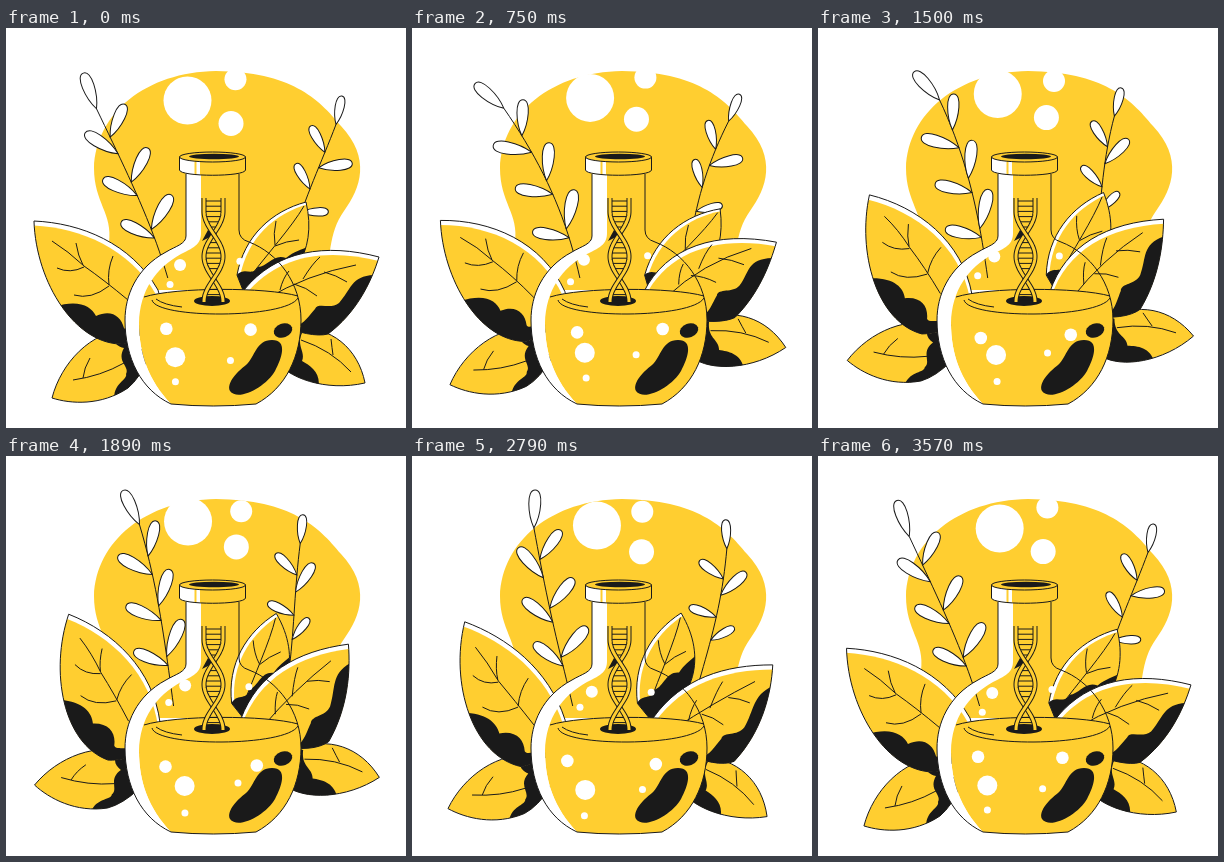
An HTML page with a canvas for the animation above (3600 ms loop, 400 by 400 pixels).

```html
<!DOCTYPE html>
<html>
<head>
<meta charset="utf-8">
<title>Flask and leaves</title>
<style>
html, body { margin: 0; height: 100%; overflow: hidden; background: #fff; }
canvas { display: block; }
</style>
</head>
<body>
<canvas id="stage" width="400" height="400"></canvas>
<script>
const ctx = document.getElementById('stage').getContext('2d');
const YELLOW = '#ffce30', INK = '#1a1a1a', WHITE = '#fff';
const LOOP = 3600, RAD = Math.PI / 180;

let now = 0;
const wave = (peak) => Math.cos((now - peak) / LOOP * 2 * Math.PI);

function fill(path, color) {
  ctx.fillStyle = color;
  ctx.fill(path);
}

function line(path, width = 1, color = INK) {
  ctx.lineWidth = width;
  ctx.strokeStyle = color;
  ctx.stroke(path);
}

function oval(x, y, rx, ry = rx, tilt = 0) {
  const path = new Path2D();
  path.ellipse(x, y, rx, ry, tilt * RAD, 0, 7);
  return path;
}

// Bubbles drift on small circles: x, y, size, orbit, start angle
const backBubbles = [
  [181.5, 69, 24, 3.5, 0], [227.5, 93, 12.5, 3.5, 45], [232.5, 53, 11, 3.5, 120]
];
const glassBubbles = [
  [176.3, 233, 6, 4.5, 30], [163, 251.5, 3.5, 5, -12], [238.3, 231.7, 3.5, 4.7, 70]
];
const liquidBubbles = [
  [160.3, 305.7, 6.3, 5, 180], [174, 329.3, 10, 4.7, 90], [174.3, 355, 3.5, 5, 103],
  [248, 305.3, 6.3, 5, 137], [228, 329.5, 3.5, 4.7, 49]
];

function drawBubbles(list) {
  for (const [x, y, size, orbit, start] of list) {
    const a = start * RAD + now / LOOP * 2 * Math.PI;
    fill(oval(x - orbit * Math.sin(a), y + orbit * Math.cos(a), size), WHITE);
  }
}

// Leaves are drawn in their pose at time 0 and bend around a pivot;
// swing and peak are [at the pivot, added per pixel of distance].
const leaves = {
  back: {
    pivot: [230, 265], swing: [13.7, 0], peak: [560, 0], shine: [3, 2],
    body: 'M300,174 C266,183 238,208 231,247 L240,270 C285,262 312,225 300,174Z',
    dark: 'M228,250 C238,236 245,250 252,239 C262,238 268,225 280,230 C290,222 298,222 308,215 L300,270 L230,280Z',
    veins: 'M298,178 C285,200 262,225 240,254 M270,193 Q267,206 269,217 M293,212 Q280,213 269,218'
  },
  lowLeft: {
    pivot: [130, 310], swing: [-12.5, 0], peak: [30, 0], shine: [0, 0],
    body: 'M46,370 C55,335 85,303 120,302 L142,330 Q134,350 122,360 C95,378 65,376 46,370Z',
    dark: 'M116,298 C103,310 108,318 118,320 C110,334 124,338 120,346 C122,352 105,356 109,374 L160,364 L150,300Z',
    veins: 'M118,335 Q95,348 67,352 M84,330 Q78,340 77,350'
  },
  lowRight: {
    pivot: [272, 298], swing: [17.5, 0], peak: [-500, 0], shine: [0, 0],
    body: 'M359,355 C352,320 325,298 290,300 L268,330 C280,350 320,364 359,355Z',
    dark: 'M280,290 L297,303 C289,318 300,323 296,333 C305,338 316,345 312,362 L262,352Z',
    veins: 'M295,312 Q325,322 345,344 M325,311 Q326,320 327,327'
  },
  left: {
    pivot: [140, 270], swing: [10.8, .011], peak: [1770, 2.9], shine: [-2, 4.5],
    body: 'M28,193 C75,195 125,215 152,262 C160,285 140,308 118,316 C70,318 30,255 28,193Z',
    dark: 'M48,279 C72,271 85,278 90,288 C105,281 115,288 118,300 C122,305 132,292 150,298 L118,334 L52,326Z',
    veins: 'M46,213 Q62,223 78,238 Q98,252 122,272 M70,215 Q72,228 77,237 M51,240 Q64,246 78,239 M107,228 Q101,242 103,257 M68,267 Q85,272 103,258'
  },
  right: {
    pivot: [245, 293], swing: [10.3, 0], peak: [-900, 6.6], shine: [1.5, 4.5],
    body: 'M373,229 C320,215 270,222 238,262 C245,290 300,312 322,306 C350,285 365,255 373,229Z',
    dark: 'M368,247 C345,248 345,262 333,275 C325,282 312,274 309,281 C303,287 295,302 285,296 L320,330 L380,270Z',
    veins: 'M350,237 Q302,246 258,272 M314,229 Q306,236 297,251 M341,254 Q330,247 318,244 M283,243 Q277,250 274,262 M311,268 Q300,259 288,256'
  }
};

function drawLeaf({ pivot: [px, py], swing, peak, shine, body, dark, veins }) {
  const bend = (text) => new Path2D(text.replace(/([\d.]+),([\d.]+)/g, (_, x, y) => {
    const dx = x - px, dy = y - py, d = Math.hypot(dx, dy);
    const top = peak[0] + peak[1] * d;
    const rest = Math.cos(top / LOOP * 2 * Math.PI);
    const a = (swing[0] + swing[1] * d) * (wave(top) - rest) * RAD;
    const c = Math.cos(a), s = Math.sin(a);
    return (px + dx * c - dy * s).toFixed(2) + ',' + (py + dx * s + dy * c).toFixed(2);
  }));
  const shape = bend(body);
  fill(shape, WHITE);
  ctx.save();
  ctx.clip(shape);
  ctx.translate(...shine);
  fill(shape, YELLOW);
  ctx.translate(-shine[0], -shine[1]);
  line(bend(veins));
  fill(bend(dark), INK);
  ctx.restore();
  line(shape);
}

// Leaflets: height on stem, mean angle, swing, time of largest angle, length
const sprigs = [
  {
    at(h) {
      const w = wave(1300 + 1100 * h - 250 * h * h);
      return [165 - 37 * h - 17 * h * h + (5 + 10 * h + 10 * h * h) * w,
              250 - 175 * h - 7 * h * h * w];
    },
    leaflets: [
      [1, -25, -27, 1000, 38], [.83, 17, -19, 1120, 36], [.73, -61, -21, 1000, 39],
      [.56, 20, -19, 1080, 38], [.48, -67, -15, 1000, 38],
      [.28, 25, -16, 1080, 40], [.23, -67, -15, 1000, 37]
    ]
  },
  {
    at(h) {
      const w = wave(-900 + 900 * h);
      return [279 + 27 * h + 6 * h * h + (4 + 14 * h) * w, 240 - 148 * h + 4.5 * h * h * w];
    },
    leaflets: [
      [1, 9.5, 12.5, 800, 29], [.8, -35, 20, 700, 30], [.69, 58, 28, 300, 34],
      [.54, -45, 31, 600, 29], [.38, 64, 26, 150, 27]
    ]
  }
];

function drawSprig({ at, leaflets }) {
  const stem = new Path2D();
  for (let i = 0; i <= 20; i++) stem.lineTo(...at(i / 20));
  line(stem);
  for (const [h, mean, swing, peak, len] of leaflets) {
    const w = len * .22;
    const drop = new Path2D(`M0,0 C${-w * .8},${-len * .35} ${-w * 1.1},${-len} 0,${-len}
      C${w * 1.1},${-len} ${w * .8},${-len * .35} 0,0Z`);
    ctx.save();
    ctx.translate(...at(h));
    ctx.rotate((mean + swing * wave(peak)) * RAD);
    fill(drop, WHITE);
    line(drop);
    ctx.restore();
  }
}

const blob = new Path2D('M103,215 C107,185 88,175 88,140 C90,85 140,44 210,43 C285,44 312,70 335,98 C365,130 355,160 338,183 C322,205 325,230 318,262 L120,262Z');
const glass = new Path2D('M180,146 L180,208 C180,216 170,218 160,224 C130,240 119,268 119,292 C119,330 135,362 165,376 Q207,380 250,376 C280,360 295,328 295,292 C295,255 272,225 243,214 Q233,211 233,202 L233,146');
const gleam = new Path2D('M180,146 L180,208 C180,216 170,218 160,224 C130,240 119,268 119,292 C119,330 135,362 165,376 C142,352 133,325 133,295 C134,262 150,240 175,226 C190,219 195,215 195,205 L195,146Z');
const liquid = new Path2D('M138,269 C170,259 260,259 292,268 Q295,280 295,292 C295,328 280,360 250,376 Q207,380 165,376 C142,352 133,325 133,295 Q134,280 138,269Z');
const rim = new Path2D('M173.5,129 L173.5,142 C174,149 239,149 239.5,142 L239.5,129Z');
const gloss = new Path2D('M224,363 C220,355 232,343 240,337 C249,329 250,312 266,312 C282,312 276,330 269,343 C260,359 232,374 224,363Z');

function drawDna() {
  const spread = (y) => 9.5 * Math.cos(Math.max(0, y - 183.5) / 45 * Math.PI);
  const rungs = new Path2D();
  for (let y = 173; y < 272; y += 5.2) {
    const x = spread(y);
    if (Math.abs(x) < 4) continue;
    rungs.moveTo(207.5 - x, y);
    rungs.lineTo(207.5 + x, y);
  }
  line(rungs);
  fill(new Path2D('M196,213 L202,202 L208,207Z'), INK);
  for (const side of [1, -1]) {
    const strand = new Path2D();
    for (let y = 170; y <= 275; y += 2) strand.lineTo(207.5 + side * spread(y), y);
    line(strand, 5);
    line(strand, 3, YELLOW);
  }
}

function drawFlask() {
  fill(liquid, YELLOW);
  line(new Path2D('M138,269 C170,259 260,259 292,268'));
  line(new Path2D('M146,272 C150,291 280,291 292,270 M150,271 Q158,277 176,279'));
  fill(oval(206, 273, 18, 5), INK);
  drawDna();
  fill(gleam, WHITE);
  drawBubbles(glassBubbles);
  drawBubbles(liquidBubbles);
  fill(gloss, INK);
  fill(oval(277, 302.5, 9.5, 7, -20), INK);
  line(glass);
  fill(rim, YELLOW);
  ctx.save();
  ctx.clip(rim);
  ctx.fillStyle = WHITE;
  ctx.fillRect(173, 129, 15.5, 20);
  ctx.fillRect(190.5, 129, 3.5, 20);
  ctx.restore();
  line(rim);
  const mouth = oval(206.5, 129, 33, 5);
  fill(mouth, YELLOW);
  line(mouth);
  fill(oval(208, 128.5, 25, 2.7), INK);
}

function draw(time) {
  now = time % LOOP;
  ctx.fillStyle = WHITE;
  ctx.fillRect(0, 0, 400, 400);
  ctx.lineJoin = 'round';
  fill(blob, YELLOW);
  drawBubbles(backBubbles);
  sprigs.forEach(drawSprig);
  Object.values(leaves).forEach(drawLeaf);
  drawFlask();
}

function tick() {
  draw(performance.now());
  requestAnimationFrame(tick);
}
tick();
</script>
</body>
</html>
```
